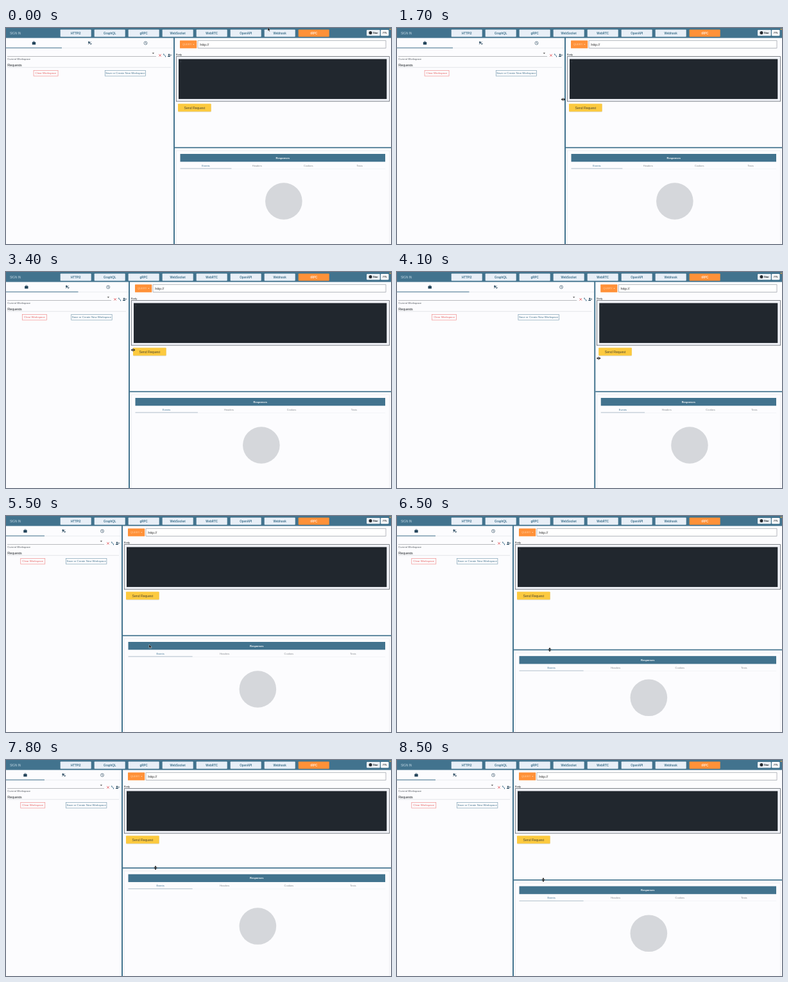
These frames come from a looping animation (600x338 px, 8.6 s). An HTML page:

```html
<!DOCTYPE html>
<html lang="en">
<head>
<meta charset="utf-8">
<title>Resizable panels</title>
<style>
  html, body { margin: 0; width: 100%; height: 100%; overflow: hidden; background: #fcfcfe; }
  svg { display: block; width: 100vw; height: 100vh; }
  text { font-family: "Liberation Sans", Arial, sans-serif; }
</style>
</head>
<body>
<svg id="stage" viewBox="0 0 600 338"></svg>
<script>
(() => {
const LOOP = 8600, STEP = 100;
const BLUE = '#42738e', ORANGE = '#ff9138', INK = '#25465c';

// Tables of [time, value], eased between entries.
const dividerX = [[1800, 261], [2600, 379], [2800, 379], [3500, 180], [4510, 379], [4600, 379], [5200, 180]];
const dividerY = [[6300, 187], [6800, 250], [6900, 250], [7500, 157], [7700, 157], [8150, 250], [8500, 187.5]];
const tabLine = [[2750, 87], [2950, 112.5], [5200, 112.5], [5450, 60]];
const pointerDX = [[0, 147], [900, 30], [1500, -2], [1800, -2], [2500, 7], [5200, 7], [5500, 43], [6300, 58], [7100, 58], [8500, 48]];
const pointerY = [[0, -1], [900, 172], [1500, 112], [2700, 109], [4100, 135], [5200, 150], [5500, 201], [6250, 187]];

function at(table, t) {
  if (t <= table[0][0]) return table[0][1];
  for (let i = 1; i < table.length; i++) {
    const [t0, a] = table[i - 1], [t1, b] = table[i];
    if (t <= t1) {
      const u = (t - t0) / (t1 - t0);
      return a + (b - a) * u * u * (3 - 2 * u);
    }
  }
  return table[table.length - 1][1];
}

const rect = (x, y, w, h, fill, extra = '') =>
  `<rect x="${x}" y="${y}" width="${w}" height="${h}" fill="${fill}" ${extra}/>`;
const box = (x, y, w, h, stroke, fill = 'none', width = 0.6) =>
  rect(x, y, w, h, fill, `stroke="${stroke}" stroke-width="${width}"`);
const path = (d, fill, extra = '') => `<path d="${d}" fill="${fill}" ${extra}/>`;
const line = (d, color, width = 0.7) => path(d, 'none', `stroke="${color}" stroke-width="${width}"`);
const circle = (x, y, r, fill, extra = '') => `<circle cx="${x}" cy="${y}" r="${r}" fill="${fill}" ${extra}/>`;
const move = (x, y, body) => `<g transform="translate(${x} ${y})">${body}</g>`;
const label = (x, y, size, fill, text, anchor = 'start', weight = 400) =>
  `<text x="${x}" y="${y}" font-size="${size}" fill="${fill}" text-anchor="${anchor}" font-weight="${weight}">${text}</text>`;
const centered = (x, y, size, fill, text, weight) => label(x, y, size, fill, text, 'middle', weight);

const icons = {
  bag: rect(-2.7, -1.7, 5.4, 4.2, INK, 'rx=".5"') + box(-1.1, -2.6, 2.2, 1.4, INK),
  rules: circle(-1.2, -1.2, 1.3, INK) + line('M-2.6 1.8L2 -2M0 1H2.8M1.2 2.6L2.8 .8', INK, 0.8),
  clock: circle(0, 0, 2.5, 'none', `stroke="${INK}" stroke-width=".6"`) + line('M0 -1.6V.2L1.3 1', INK, 0.6),
  cross: line('M-1.8 -1.8L1.8 1.8M1.8 -1.8L-1.8 1.8', '#e0464c', 0.8),
  branch: line('M-1.4 -2V-.7L1.3 .8V2.3', BLUE, 0.8) + circle(-1.4, -1.8, 0.7, BLUE) + circle(1.3, 2, 0.7, BLUE),
  person: circle(-0.8, -1.2, 1.2, INK) + path('M-3 2.2Q-3 .4 -.8 .4T1.4 2.2Z', INK) + line('M.9 -.4H3.1M2 -1.5V.7', INK, 0.6)
};

function header() {
  const names = ['HTTP/2', 'GraphQL', 'gRPC', 'WebSocket', 'WebRTC', 'OpenAPI', 'Webhook', 'tRPC'];
  const buttons = names.map((name, i) => {
    const x = 84.7 + i * 53, active = name === 'tRPC';
    return rect(x, 2.5, 48, 11.2, active ? ORANGE : '#e8eff7', 'rx=".8"') +
      centered(x + 24, 9.7, 4.5, active ? '#ffe9d6' : BLUE, name, 700);
  });
  return rect(0, 0, 600, 15.6, BLUE) + label(6, 9.8, 4.6, '#c6dae6', 'SIGN IN') + buttons.join('') +
    rect(562, 3, 20.8, 9.2, '#ebf0f4', 'rx="1.2"') + circle(568, 7.6, 2.5, '#24292f') +
    label(572, 9.1, 4, '#24292f', 'Star', 'start', 700) +
    rect(584, 3, 12.4, 9.2, '#fff', 'rx="1.2"') + centered(590.2, 9.1, 4, '#24292f', '775', 700) +
    circle(598.6, 2, 1, '#e8a33c');
}

function workspace(w, underline) {
  const tab = Math.min(w / 3, 112.5), clear = w / 4 - 3.2, save = w * 0.75 - 9.8;
  return ['bag', 'rules', 'clock'].map((name, i) => move(tab * (i + 0.5), 23.6, icons[name])).join('') +
    rect(0, 30.9, w, 0.5, '#d5d9de') + rect(0, 30.6, underline, 1, BLUE) +
    path(`M${w - 33.3} 38.8h3.4l-1.7 1.8z`, '#444') + rect(2, 44.1, w - 29, 0.6, '#8b8f94') +
    move(w - 21, 42.8, icons.cross) + move(w - 13.8, 42.8, icons.branch) + move(w - 6.2, 42.8, icons.person) +
    label(2.2, 49.5, 4.2, '#555b62', 'Current Workspace') +
    label(2.3, 59.8, 5.3, '#22272c', 'Requests') + rect(2, 61.6, w - 6, 0.5, '#c9ccd1') +
    box(clear - 19, 66.3, 38, 8.8, '#ef7d7d') + centered(clear, 72.2, 4.3, '#e8605f', 'Clear Workspace') +
    box(save - 31.7, 66.3, 63.4, 8.8, '#6d93a9') + centered(save, 72.2, 4.3, BLUE, 'Save or Create New Workspace');
}

function request(x) {
  return rect(x + 8, 19.6, 26.2, 12.2, ORANGE, 'rx=".6"') +
    label(x + 12, 27.2, 4.1, '#ffd0a4', 'QUERY') + path(`M${x + 28} 25.1h2.6l-1.3 1.5z`, '#ffd0a4') +
    box(x + 36, 19.8, 556 - x, 11.8, '#858b93', '#fff') + label(x + 39.3, 27.7, 5.6, '#333', 'http://') +
    label(x + 2, 43, 4, '#22272c', 'Body') +
    box(x + 2.3, 44.6, 595.2 - x, 70.2, '#62676e', '#f2f4f9', 0.8) + rect(x + 6, 48.6, 587.3 - x, 62.5, '#21272e') +
    rect(x + 9.5, 51.6, 0.5, 2, '#4a525c') +
    rect(x + 5.2, 119, 51.6, 12.4, '#000', 'rx=".8" opacity=".14"') +
    rect(x + 5, 118.5, 51.6, 12.2, '#fcca3f', 'rx=".8"') + centered(x + 30.8, 126.6, 5.15, '#4b4632', 'Send Request');
}

function responses(x, y) {
  const left = x + 8.5, width = 591 - left, tab = width / 4;
  const tabs = ['Events', 'Headers', 'Cookies', 'Tests'].map((name, i) =>
    centered(left + tab * (i + 0.5), y + 29.6, 4, i ? '#85898e' : '#386e91', name)).join('');
  return rect(x, y - 0.6, 600 - x, 1.7, BLUE) +
    line(`M${x + 2.3} 338V${y + 5}H597.6V338`, '#e2e5ea', 0.6) +
    rect(left, y + 10, width, 12.3, BLUE) + centered(left + width / 2, y + 17.5, 4, '#fff', 'Responses', 700) +
    tabs + rect(left, y + 33, width, 0.4, '#e3e6ea') + rect(left, y + 32.5, tab, 0.8, '#a3b4c2') +
    circle(left + width / 2 + 1.6, 271 + (y - 187) * 0.6, 28.8, '#d5d7db');
}

function pointer(t, x, y) {
  const arrows = line('M-1.5 0H1.5M0 -2.5V2.5', '#222', 0.8) + path('M-3.4 0L-1 -1.8V1.8ZM3.4 0L1 -1.8V1.8Z', '#222');
  const arrow = path('M0 0V5.8L1.4 4.5L2.4 6.6L3.4 6.1L2.4 4.1H4.2Z', '#111', 'stroke="#fff" stroke-width=".4"');
  if (t >= 1500 && t < 5300) return move(x, y, arrows);
  return move(x, y, t >= 6200 ? `<g transform="rotate(90)">${arrows}</g>` : arrow);
}

const stage = document.getElementById('stage');
const headerBar = header();

function draw(t) {
  const x = at(dividerX, t), y = at(dividerY, t);
  stage.innerHTML = rect(0, 0, 600, 338, '#fcfcfe') + workspace(x, at(tabLine, t)) +
    request(x + 2) + responses(x + 2, y) + rect(x, 15, 2, 323, BLUE) + headerBar +
    pointer(t, x + at(pointerDX, t), at(pointerY, t) + y - 187);
}

const start = performance.now();
let shown = -1;
function tick() {
  const t = Math.floor((performance.now() - start) % LOOP / STEP) * STEP;
  if (t !== shown) draw(shown = t);
  requestAnimationFrame(tick);
}
tick();
})();
</script>
</body>
</html>
```
